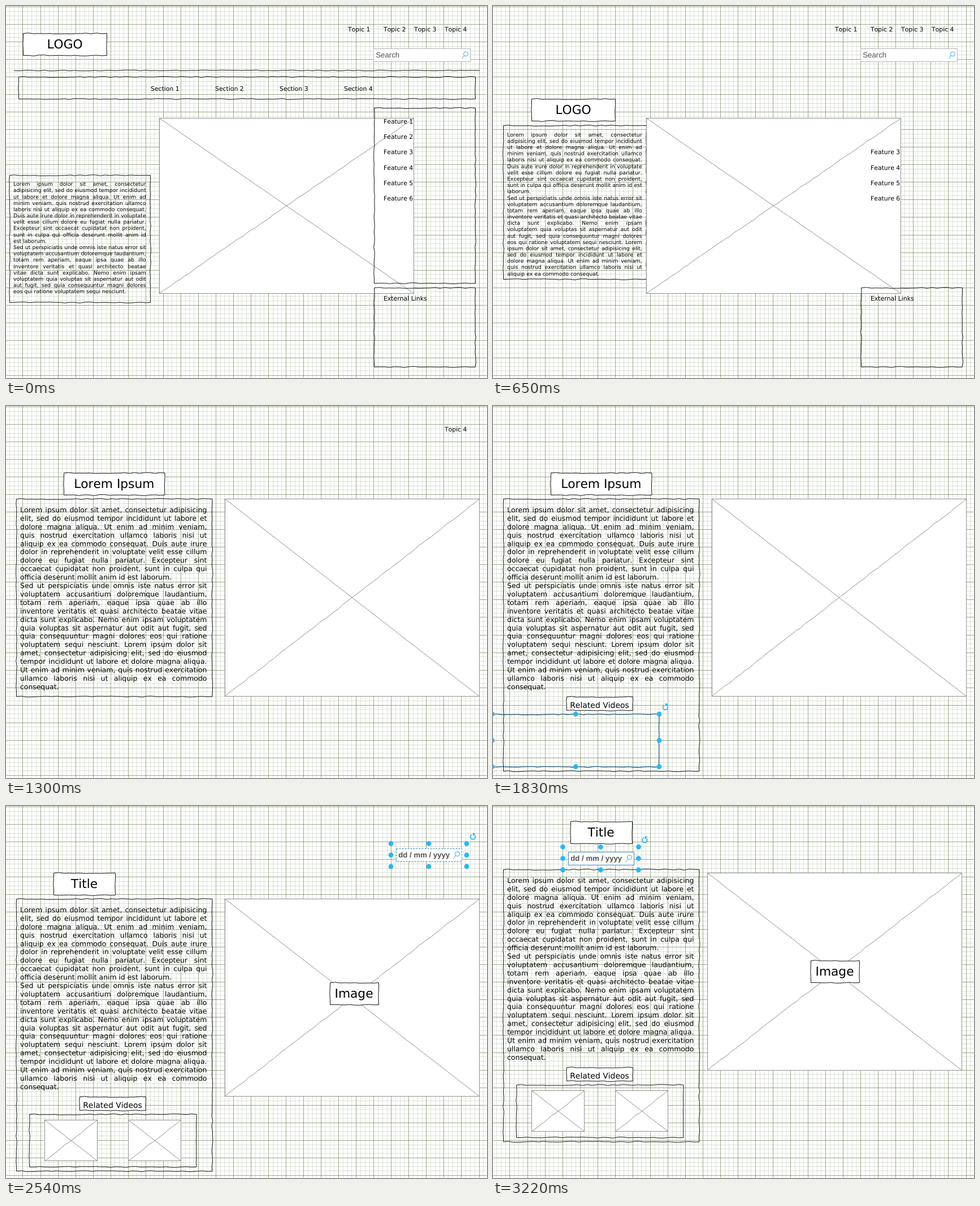
An HTML page with a canvas for the animation above (3.5 s loop, 851 px wide and 658 px high).

```html
<!DOCTYPE html>
<html lang="en">
<head>
<meta charset="utf-8">
<title>Wireframe sketch</title>
<style>
  html, body { margin: 0; width: 100%; height: 100%; overflow: hidden; background: #fff; }
  canvas { display: block; }
</style>
</head>
<body>
<canvas id="stage" width="851" height="658"></canvas>
<script>
const W = 851, H = 658, LOOP = 3500;
const ZOOM = 0.776, CELL = 10 * ZOOM;
const SMALL = 12 * ZOOM, LABEL = 14 * ZOOM, BODY = 16 * ZOOM, SUBHEAD = 18 * ZOOM, HEAD = 28 * ZOOM;
const INK = '#111', GRAY = '#909090', BLUE = '#29b6f2';
const SANS = '"DejaVu Sans", Verdana, sans-serif';
const ARIAL = '"Liberation Sans", Arial, sans-serif';
const LINGER = 80;     // how long a moved part stays selected
const REGROUP = 3040;  // from here parts move together, without handles
const ctx = document.getElementById('stage').getContext('2d');
ctx.fontKerning = 'none';
ctx.textRendering = 'geometricPrecision';

const INTRO = 'Lorem ipsum dolor sit amet, consectetur adipisicing elit, sed do eiusmod tempor incididunt ut labore et dolore magna aliqua. Ut enim ad minim veniam, quis nostrud exercitation ullamco laboris nisi ut aliquip ex ea commodo consequat.';
const FIRST = INTRO + ' Duis aute irure dolor in reprehenderit in voluptate velit esse cillum dolore eu fugiat nulla pariatur. Excepteur sint occaecat cupidatat non proident, sunt in culpa qui officia deserunt mollit anim id est laborum.';
const SECOND = 'Sed ut perspiciatis unde omnis iste natus error sit voluptatem accusantium doloremque laudantium, totam rem aperiam, eaque ipsa quae ab illo inventore veritatis et quasi architecto beatae vitae dicta sunt explicabo. Nemo enim ipsam voluptatem quia voluptas sit aspernatur aut odit aut fugit, sed quia consequuntur magni dolores eos qui ratione voluptatem sequi nesciunt.';

const clamp = k => Math.min(1, Math.max(0, k));
const ease = k => k * k * (3 - 2 * k);

function noise(i, seed) {
  const v = Math.sin(i * 127.1 + seed * 311.7) * 43758.5453;
  return v - Math.floor(v) - 0.5;
}

// Hand-drawn stroke from the current point
function rough(x1, y1, x2, y2, seed, amp = 1.8) {
  const len = Math.hypot(x2 - x1, y2 - y1) || 1;
  const n = Math.max(2, Math.round(len / 9));
  const nx = (y1 - y2) / len, ny = (x2 - x1) / len;
  for (let i = 1; i <= n; i++) {
    const d = i < n ? noise(i, seed) * amp : 0;
    ctx.lineTo(x1 + (x2 - x1) * i / n + nx * d, y1 + (y2 - y1) * i / n + ny * d);
  }
}

function roughLine(x1, y1, x2, y2, seed, amp) {
  ctx.beginPath();
  ctx.moveTo(x1, y1);
  rough(x1, y1, x2, y2, seed, amp);
  ctx.stroke();
}

const snap = v => Math.round(v) + 0.5;

function box(x, y, w, h, fill) {
  x = snap(x);
  y = snap(y);
  ctx.beginPath();
  ctx.moveTo(x, y);
  rough(x, y, x + w, y, 1);
  rough(x + w, y, x + w, y + h, 2);
  rough(x + w, y + h, x, y + h, 3);
  rough(x, y + h, x, y, 4);
  ctx.closePath();
  if (fill) { ctx.fillStyle = '#fff'; ctx.fill(); }
  ctx.strokeStyle = INK;
  ctx.stroke();
}

function text(str, x, y, size, align = 'left', font = SANS, color = '#000', weight = '') {
  ctx.font = `${weight} ${size}px ${font}`;
  ctx.textAlign = align;
  ctx.fillStyle = color;
  ctx.fillText(str, x, y);
}

function caption(str, x, y, w, h, size) {
  box(x, y, w, h, true);
  text(str, x + w / 2, y + h / 2 + 7.8, size, 'center');
}

function picture(x, y, w, h) {
  x = snap(x);
  y = snap(y);
  w = Math.round(w);
  h = Math.round(h);
  ctx.fillStyle = '#fff';
  ctx.fillRect(x, y, w, h);
  ctx.strokeStyle = GRAY;
  ctx.strokeRect(x, y, w, h);
  roughLine(x, y, x + w, y + h, 4, 0.3);
  roughLine(x + w, y, x, y + h, 5, 1.5);
}

const widths = new Map();
function em(str) {
  if (!widths.has(str)) {
    ctx.font = `1000px ${SANS}`;
    widths.set(str, ctx.measureText(str).width / 1000);
  }
  return widths.get(str);
}

function wrap(str, room) {
  const lines = [[]];
  let used = 0;
  for (const word of str.split(' ')) {
    if (used + em(word) > room) { lines.push([]); used = 0; }
    lines.at(-1).push(word);
    used += em(word) + em(' ');
  }
  return lines;
}

function justified(x, y, w, size, copy) {
  const room = (w - 9.2) / size - 0.55;
  let base = y + 7.2 + 1.35 * size;
  for (const str of copy) {
    wrap(str, room).forEach((words, i, all) => {
      const spare = room - words.reduce((sum, s) => sum + em(s), 0);
      const gap = i === all.length - 1 ? em(' ') : spare / (words.length - 1);
      let pen = x + 7;
      for (const s of words) {
        text(s, pen, base, size);
        pen += (em(s) + gap) * size;
      }
      base += size * 1.2;
    });
  }
}

function field(x, y, w, h, str, weight, edge, dash = []) {
  x = snap(x);
  y = snap(y);
  ctx.fillStyle = '#fff';
  ctx.fillRect(x, y, w, h);
  ctx.strokeStyle = edge;
  ctx.setLineDash(dash);
  ctx.strokeRect(x, y, w, h);
  ctx.setLineDash([]);
  text(str, x + 3.8, y + 15.3, 17 * ZOOM, 'left', ARIAL, '#505050', weight);
  ctx.strokeStyle = '#3aa5e0';
  ctx.beginPath();
  ctx.arc(x + w - 8, y + 9.3, 4, 0, 7);
  ctx.moveTo(x + w - 10.8, y + 12.2);
  ctx.lineTo(x + w - 15.3, y + 18.2);
  ctx.stroke();
}

function selection(x, y, w, h, outline) {
  ctx.strokeStyle = ctx.fillStyle = BLUE;
  if (outline) {
    ctx.setLineDash([3, 3]);
    ctx.strokeRect(x + 0.5, y + 0.5, w, h);
    ctx.setLineDash([]);
  }
  for (let i = 0; i < 9; i++) {
    if (i === 4) continue;
    ctx.beginPath();
    ctx.arc(x + 0.5 + w * (i % 3) / 2, y + 0.5 + h * Math.floor(i / 3) / 2, 4.4, 0, 7);
    ctx.fill();
  }
  // rotate icon
  const cx = x + w + 11.5, cy = y - 11.5;
  ctx.lineWidth = 1.8;
  ctx.beginPath();
  ctx.arc(cx, cy, 4.4, -0.25 * Math.PI, 1.35 * Math.PI);
  ctx.stroke();
  ctx.lineWidth = 1;
  ctx.beginPath();
  ctx.moveTo(cx - 0.5, cy - 7);
  ctx.lineTo(cx + 4.8, cy - 6);
  ctx.lineTo(cx + 0.5, cy - 1.5);
  ctx.fill();
}

function grid() {
  for (let i = -4; i * CELL < W; i++) {
    ctx.fillStyle = `rgba(80,108,52,${i % 4 ? 0.19 : 0.57})`;
    ctx.fillRect(Math.round(29.48 + i * CELL), 0, 1, H);
    ctx.fillRect(0, Math.round(1 + i * CELL), W, 1);
  }
}

// A part has a first place and moves of the form [start, end, dx, dy, dw, dh]
const part = (rect, draw, moves = [], more = {}) =>
  ({ rect, draw, moves, from: 0, to: LOOP, ...more });
const until = (to, rect, draw) => part(rect, draw, [], { to });
const note = (to, str, x, cy) =>
  until(to, [x - 2, cy - 8, 56, 15], () => text(str, x, cy + 4, LABEL));
const notes = (count, make) => Array.from({ length: count }, (_, i) => make(i));
const frame = (x, y, w, h) => box(x, y, w, h);

function place({ rect, moves }, t) {
  return rect.map((v, i) => moves.reduce((sum, [start, end, ...delta]) =>
    sum + (delta[i] || 0) * ease(clamp((t - start) / (end - start || 1))), v));
}

function picked({ from, to, moves, stays }, t) {
  if (to < LOOP) return t >= to - 20;
  if (t >= REGROUP) return stays && t > 3140;
  return from > 0 && t < from + LINGER
    || moves.some(([start, end]) => t >= start && t < end + LINGER);
}

const rise = [REGROUP, 3110, 0, -52];

const parts = [
  part([6, 298.5, 249, 225], (x, y, w, h, t) => {
    box(x, y, w, h);
    justified(x, y, w, t < 1160 ? SMALL : BODY, [FIRST, t < 400 ? SECOND : SECOND + ' ' + INTRO]);
  }, [[300, 400, 12, -87.5, 4, 47], [1100, 1160, 0, -47, 93.5, 77.5], [1430, 1520, 0, 0, 0, 132], rise]),

  part([271, 198, 450, 310], picture,
    [[950, 1020, 116, -34], [1020, 1060, 0, 0, 0, 39], [3110, 3170, -8, -46]]),

  until(160, [14, 114, 824, 0], (x, y, w) => {
    ctx.strokeStyle = INK;
    roughLine(x, y, x + w, y, 6);
  }),
  until(310, [22, 125, 808, 39], frame),
  ...notes(4, i => note(190 + 30 * i, 'Section ' + (i + 1), 256 + 114 * i, 146)),
  until(570, [651, 180, 179, 310], frame),
  ...notes(6, i => note(600 + 50 * i, 'Feature ' + (i + 1), 668, 204 + 27.2 * i)),
  until(910, [651, 498, 179, 140], frame),
  note(880, 'External Links', 668, 517),
  until(940, [650, 75, 171, 23], (x, y, w, h) => field(x, y, w, h, 'Search', '', '#b4b4b4')),
  note(1230, 'Topic 1', 605, 41),
  note(1260, 'Topic 2', 668, 41),
  note(1290, 'Topic 3', 722, 41),
  note(1400, 'Topic 4', 776, 41),

  part([30, 48, 148, 39], (x, y, w, h, t) =>
    caption(t < 1160 ? 'LOGO' : t < 2420 ? 'Lorem Ipsum' : 'Title', x, y, w, h, HEAD),
    [[420, 540, 38, 116], [1060, 1100, 34, -46], [1160, 1160, 0, 0, 30.5],
      [2420, 2420, -18, 0, -69.5], [2960, 3040, 52.5, -91]]),

  part([200, 575, 117, 24], (x, y, w, h) => caption('Related Videos', x, y, w, h, SUBHEAD),
    [[1560, 1640, -70, -61], rise], { from: 1560 }),

  part([-60, 565, 295.5, 93], frame,
    [[1750, 1830, 58, -20.5], [1900, 1960, 43, 0], rise], { from: 1750 }),
  part([68, 555, 93, 72], picture, [rise], { from: 1990 }),
  part([76, 563, 93, 72], picture, [[2050, 2110, 140, -8], rise], { from: 2050 }),

  part([400, 250, 178.5, 39], (x, y, w, h, t) =>
    caption(t < 2330 ? 'Lorem Ipsum' : 'Image', x, y, w, h, HEAD),
    [[2130, 2190, 126, 69], [2330, 2330, 46.5, -7.5, -92.5], [3110, 3170, -11, -38.7]], { from: 2130 }),

  part([690, 75, 116, 23], (x, y, w, h, t) =>
    field(x, y, w, h, 'dd / mm / yyyy', 'bold', '#3c86b8', t < 3220 ? [3, 2] : []),
    [[2570, 2820, -390, 35], [2850, 2900, -45.5, 15], [3150, 3220, -122, -44]],
    { from: 2520, stays: true })
];

function render(t) {
  ctx.fillStyle = '#fff';
  ctx.fillRect(0, 0, W, H);
  ctx.lineWidth = 1;
  grid();
  const live = parts.filter(p => t >= p.from && t < p.to);
  for (const p of live) p.draw(...place(p, t), t);
  for (const p of live.filter(p => picked(p, t))) {
    const [x, y, w, h] = place(p, t);
    if (p.stays) selection(x - 9.5, y - 9, w + 18, h + 17.5, false);
    else selection(x, y, w, h, true);
  }
}

const start = performance.now();
function tick() {
  render((performance.now() - start) % LOOP);
  requestAnimationFrame(tick);
}
tick();
</script>
</body>
</html>
```
